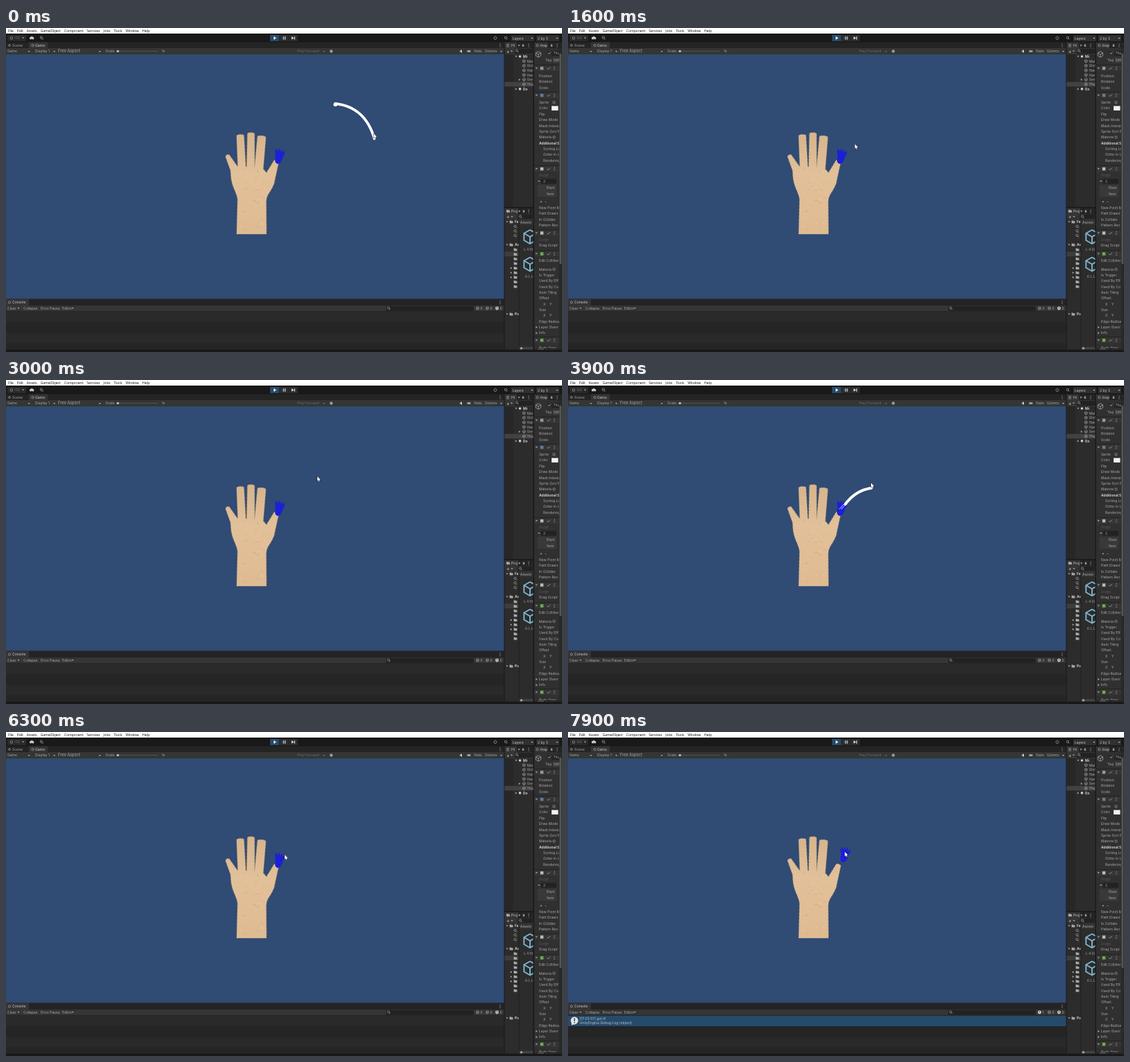
An HTML page with a canvas that plays this animation: 800 by 467 pixels, repeating every 8000 ms.

```html
<!DOCTYPE html>
<html>
<head>
<meta charset="utf-8">
<style>
html, body { margin: 0; width: 100%; height: 100%; overflow: hidden; background: #191919; }
canvas { display: block; }
</style>
</head>
<body>
<canvas id="stage" width="800" height="467"></canvas>
<script>
const stage = document.getElementById('stage');
const ui = document.createElement('canvas');
ui.width = 800;
ui.height = 467;
let g = ui.getContext('2d');

const LOOP = 8000, STEP = 100;
const SANS = 'Inter, Roboto, sans-serif';
const MENU = '"Open Sans", sans-serif';
const TAB = '#242424', BAR = '#353535', PANEL = '#2c2c2c', FIELD = '#222', INK = '#aaa', BRIGHT = '#cfcfcf';

let seed = 7;
const rnd = () => (seed = seed * 16807 % 2147483647) / 2147483647;
const mix = (a, b, f) => a + (b - a) * f;
const ease = f => f * f * (3 - 2 * f);

function box(x, y, w, h, color) {
  g.fillStyle = color;
  g.fillRect(x, y, w, h);
}
function text(s, x, y, color = INK, size = 5, weight = 400, font = SANS) {
  g.font = `${weight} ${size}px ${font}`;
  g.textBaseline = 'middle';
  g.fillStyle = color;
  g.fillText(s, x, y + 0.3);
  return g.measureText(s).width;
}
function trace(pts, close) {
  g.beginPath();
  pts.forEach(([x, y]) => g.lineTo(x, y));
  if (close) g.closePath();
}
function poly(pts, color) {
  trace(pts, true);
  g.fillStyle = color;
  g.fill();
}
function line(pts, color, width = 0.8) {
  trace(pts);
  g.strokeStyle = color;
  g.lineWidth = width;
  g.stroke();
}
function dot(x, y, r, color) {
  g.beginPath();
  g.arc(x, y, r, 0, 7);
  g.fillStyle = color;
  g.fill();
}
function ring(x, y, r, color = INK, width = 0.7) {
  g.beginPath();
  g.arc(x, y, r, 0, 7);
  g.strokeStyle = color;
  g.lineWidth = width;
  g.stroke();
}
function panel(x, y, w, h, draw) {
  g.save();
  g.beginPath();
  g.rect(x, y, w, h);
  g.clip();
  draw();
  g.restore();
}

// small icons
const down = (x, y, c = INK) => poly([[x - 1.6, y - 0.9], [x + 1.6, y - 0.9], [x, y + 1.1]], c);
const right = (x, y, c = INK, r = 1.6) => poly([[x - r * 0.7, y - r], [x + r * 0.8, y], [x - r * 0.7, y + r]], c);
function dots(x, y) {
  for (let i = -1; i < 2; i++) box(x - 0.5, y + i * 2 - 0.5, 1, 1, INK);
}
function lens(x, y) {
  ring(x, y - 0.5, 1.6);
  line([[x + 1.1, y + 0.7], [x + 2.4, y + 2.1]], INK);
}
function lock(x, y) {
  box(x - 1.2, y - 0.3, 2.4, 2, INK);
  ring(x, y - 0.7, 0.9, INK, 0.6);
}
function folder(x, y) {
  box(x - 2.4, y - 2, 2.4, 1, INK);
  box(x - 2.4, y - 1.3, 4.8, 3.2, INK);
}
function cube(x, y, r, color, width) {
  const at = i => [x + r * Math.sin(i * Math.PI / 3), y - r * Math.cos(i * Math.PI / 3)];
  line([0, 1, 2, 3, 4, 5, 6].map(at), color, width);
  for (const i of [1, 3, 5]) line([[x, y], at(i)], color, width);
}
function tab(x, y, w, label, tx) {
  box(x, y, w, 9, BAR);
  text(label, tx, y + 4.6, BRIGHT);
}
function badge(x, color, count) {
  dot(x, 404, 2.4, color);
  box(x - 0.4, 402.4, 0.9, 2.2, '#444');
  text(count, x + 4, 404);
}

function drawMenu() {
  box(0, 0, 800, 8, '#fff');
  let x = 3;
  for (const s of 'File Edit Assets GameObject Component Services Jobs Tools Window Help'.split(' '))
    x += text(s, x, 4, '#111', 5, 400, MENU) + 5;

  box(2, 10, 27, 9, '#2a2a2a');
  ring(8, 14.5, 1.8);
  text('GC', 13, 14.5, '#777');
  down(24.5, 14.5);
  for (let i = 0; i < 3; i++) dot(35.5 + i * 1.6, 14.8 - i % 2, 1.7, '#ccc');
  ring(51, 14, 1.8, '#888');
  line([[49, 12], [54, 17]], '#888');
  for (let i = 0; i < 3; i++) box(380 + i * 13.4, 10, 12.9, 9, i ? '#2d2d2d' : '#294a6b');
  right(387, 14.5, '#e4eef8', 2.6);
  for (const u of [398.6, 401.1, 414.6]) box(u, 12.3, 1.2, 4.5, '#ddd');
  right(412.5, 14.5, '#ddd', 2.3);
  ring(704, 14.5, 2);
  lens(719, 14.5);
  for (const [s, u] of [['Layers', 727], ['2 by 3', 763]]) {
    box(u, 10.5, 33, 8.5, '#303030');
    text(s, u + 2, 14.7, BRIGHT);
    down(u + 30, 14.8);
  }
}

function drawGame() {
  box(0, 20.5, 716.5, 9, TAB);
  ring(5, 25, 1.4);
  text('Scene', 9, 25);
  tab(33, 20.5, 27, 'Game', 42);
  ring(38.5, 25, 1.6);
  dots(711, 25);
  box(0, 29, 716.5, 9, BAR);
  for (const [s, x, arrow] of [['Game', 2, 33], ['Display 1', 42, 69.5], ['Free Aspect', 75, 135], ['Gizmos', 689, 712.5]]) {
    text(s, x, 33.5, INK, s[0] === 'F' ? 5.6 : 5);
    down(arrow, 33.8);
  }
  text('Scale', 143, 33.5);
  box(158, 33.2, 60, 0.8, '#5c5c5c');
  dot(161, 33.5, 1.8, '#b5b5b5');
  text('1x', 224, 33.5);
  text('Play Focused', 419, 33.5, '#6c6c6c');
  down(457.5, 33.8, '#6c6c6c');
  dot(468, 33.5, 2.2, '#999');
  poly([[652.5, 33.5], [656, 31], [656, 36]], '#ccc');
  box(663.5, 32, 5, 3, '#999');
  text('Stats', 673, 33.5);
  box(0, 38, 716.5, 352.5, '#304b74');
}

function drawConsole() {
  box(0, 391, 716.5, 9, TAB);
  tab(0, 391, 33, 'Console', 9);
  ring(5, 395.5, 1.5);
  dots(711, 395.5);
  box(0, 400, 716.5, 8.5, BAR);
  text('Clear', 2, 404);
  text('Collapse', 25, 404);
  text('Error Pause', 50, 404);
  text('Editor', 81, 404);
  down(18, 404);
  down(96, 404);
  box(547, 400.7, 126, 7, FIELD);
  lens(550.5, 404);
  for (let i = 0; i < 4; i++) box(0, 409 + i * 15.3, 716.5, 15.3, i % 2 ? '#252525' : '#2a2a2a');
  box(0, 463.5, 716.5, 3.5, '#181818');
  badge(678.5, '#777', '0');
  badge(692.5, '#777', '0');
  badge(706.5, '#ccc', '0');
}

function drawHierarchy() {
  panel(717.5, 20.5, 41, 237.5, () => {
    box(717, 20, 42, 9, TAB);
    tab(717, 20.5, 18, 'Hi', 727);
    for (let i = 0; i < 3; i++) box(720, 23 + i * 1.8, 4, 0.7, INK);
    right(738.5, 25);
    lock(744, 25);
    dots(752, 25);
    box(717, 29, 42, 9, BAR);
    text('+', 720, 33.3, BRIGHT, 7);
    down(727.5, 33.5);
    box(732, 30, 28, 7, FIELD);
    lens(735, 33);
    box(717, 38, 42, 220, PANEL);
    box(717, 38, 13, 220, '#272727');
    box(717, 77.8, 42, 6.6, '#424242');
    ['Mi', 'Mai', 'Glob', 'Han', 'Han', 'Gen', 'Thu', 'Do'].forEach((s, i) => {
      const y = 41 + i * 6.7, scene = i % 7 === 0;
      if (scene) dot(739.5, y, 1.8, BRIGHT); else cube(745.3, y, 2.2, INK, 0.6);
      text(s, scene ? 744 : 749.5, y, scene ? BRIGHT : INK, 5, scene ? 700 : 400);
    });
    down(734, 41);
    right(739, 74.5);
    right(734, 88);
  });
}

function drawProject() {
  panel(717.5, 259.5, 41, 204, () => {
    box(717, 259, 42, 9, TAB);
    tab(717, 259.5, 20, 'Proj', 727);
    folder(722.5, 264);
    right(739, 264);
    lock(745, 264);
    dots(752, 264);
    box(717, 268, 42, 8, BAR);
    text('+', 720, 271.7, BRIGHT, 7);
    down(728, 272);
    box(736, 268.7, 24, 6.5, FIELD);
    lens(740, 272);
    box(717, 276, 42, 188, PANEL);
    box(738, 276, 21, 8, '#333');
    box(737.5, 276, 0.8, 188, '#1d1d1d');
    panel(717, 276, 20.5, 188, () => {
      box(717, 322.5, 21, 6.6, '#3d3d3d');
      for (const [s, y] of [['Fav', 279.5], ['Ass', 312.5], ['Pac', 412.5]]) {
        down(721, y);
        folder(727, y);
        text(s, 732, y, BRIGHT, 5, 700);
      }
      for (let i = 0; i < 3; i++) lens(732.5, 286.3 + i * 6.6);
      for (let i = 0; i < 9; i++) folder(733, 319.5 + i * 6.65);
      for (let i = 4; i < 7; i++) right(727, 319.5 + i * 6.65);
    });
    text('Assets', 740, 280);
    ['L-4 Di', '6-L Li'].forEach((s, i) => {
      cube(754, 301 + i * 39.5, 10, '#7fb6cf', 1.9);
      text(s, 745 + i * 2, 319.5 + i * 38.5, INK, 4.6);
    });
    box(738, 459, 21, 5, BAR);
    box(740, 461.5, 18, 0.7, '#666');
    dot(741.5, 461.8, 1.7, INK);
  });
}

// heading y, icon colour, first row y, rows
const sections = [
  [58, '#999', 69, 'Position|Rotation|Scale'],
  [97, '#5f7f9f', 107.3, 'Sprite|Color|Flip|Draw Mode|Mask Interac|Sprite Sort P|Materia|*Additional S|>Sorting La|>Order in La|>Rendering'],
  [203, '#bbb', 212, '-Script'],
  [0, '', 259, 'New Point M|Path Drawn|In Collider|Pattern Rec'],
  [295.5, '#bbb', 305, '-Script|Drag Script'],
  [325.5, '#6db04f', 335.5, 'Edit Collider'],
  [0, '', 347.8, 'Materia|Is Trigger|Used By Eff|Used By Co|Auto Tiling|Offset|>X    Y|Size|>X    Y|Edge Radius|Layer Overr|Info'],
  [450, '#6db04f', 461, 'Body Type']
];

function drawSection([head, color, top, rows]) {
  if (head) {
    box(760, head - 5, 36, 9, '#353535');
    box(760, head - 5, 36, 0.8, '#1d1d1d');
    down(763.3, head);
    box(768.8, head - 2.2, 4.5, 4.5, color);
    line([[778.5, head], [780, head + 1.5], [783, head - 1.5]], INK);
    dots(789, head);
  }
  rows.split('|').forEach((s, i) => {
    const label = s.replace(/^[*>-]/, ''), y = top + i * 8.35;
    const color = s[0] === '-' ? '#5c5c5c' : s[0] === '*' ? BRIGHT : INK;
    text(label, s[0] === '>' ? 773 : 767, y, color, 5, s[0] === '*' ? 700 : 400);
    if (label === 'Materia' || label === 'Sprite') ring(788.5, y, 1.7);
    if (label === 'Color') box(785, y - 3.2, 9.5, 6.4, '#f2f2f2');
  });
}

function drawInspector() {
  panel(760, 20.5, 40, 443, () => {
    box(760, 20, 40, 9, TAB);
    tab(760, 20.5, 19, 'Insp', 769);
    ring(764.5, 25, 1.6);
    lock(785, 25);
    dots(793, 25);
    box(760, 29, 40, 435, '#303030');
    cube(766, 38, 4.2, INK, 0.8);
    box(779.5, 34, 4.5, 4.5, FIELD);
    line([[780.3, 36], [781.4, 37.4], [783.3, 34.8]], '#ddd');
    box(786, 33, 10, 7, FIELD);
    text('Thu', 787.5, 36.5);
    text('Tag', 776, 46);
    box(787, 43, 9, 7, '#404040');
    text('Unt', 788, 46.3);
    sections.forEach(drawSection);
    box(770, 217.5, 22, 7, FIELD);
    text('2', 773, 221);
    down(767, 221);
    box(765, 226, 27, 17.5, '#393939');
    text('Elem', 778, 230.3);
    text('Item', 778, 239.3);
    text('+  -', 768, 250, BRIGHT, 6);
    for (const y of [431.3, 439.7]) right(763.5, y);
    box(795.8, 29, 4.2, 435, '#292929');
    box(796.4, 37, 2.8, 303, '#555');
    box(760, 461.5, 36, 4, '#292929');
    box(765, 462, 9, 2.2, '#555');
  });
}

// tapered limb from a base to a rounded tip; the last value of each end is half its width
function finger([bx, by, bw], [tx, ty, tw]) {
  const a = Math.atan2(ty - by, tx - bx), nx = -Math.sin(a), ny = Math.cos(a);
  const p = new Path2D();
  const cx = tx - Math.cos(a) * 2, cy = ty - Math.sin(a) * 2;
  p.moveTo(bx - nx * bw, by - ny * bw);
  p.lineTo(cx - nx * tw, cy - ny * tw);
  p.ellipse(cx, cy, 2, tw, a, -Math.PI / 2, Math.PI / 2);
  p.lineTo(bx + nx * bw, by + ny * bw);
  return p;
}

function drawHand() {
  const palm = new Path2D(`M332 297 L333.3 247 C332 235 323 228 323.5 206 L331 199 L369 202
    L386 222 C383 235 375 238 374.3 250 L374.7 297 Z`);
  const parts = [palm,
    finger([331, 208, 6.5], [318, 183, 3]),
    finger([339.6, 206, 5.7], [337, 153.5, 5.2]),
    finger([352, 206, 5.7], [352.5, 150.8, 5]),
    finger([363.6, 206, 6.2], [368, 155.3, 6]),
    finger([377, 222, 9], [389.7, 190.5, 3.5])];
  g.setLineDash([2, 1.3, 1, 0.7]);
  g.strokeStyle = '#a58a6c';
  g.lineWidth = 1.2;
  parts.forEach(p => g.stroke(p));
  g.setLineDash([]);
  const skin = g.createLinearGradient(0, 150, 0, 297);
  skin.addColorStop(0, '#d5b48c');
  skin.addColorStop(0.4, '#e2c099');
  skin.addColorStop(1, '#dfbb92');
  g.fillStyle = skin;
  parts.forEach(p => g.fill(p));
  for (let i = 0; i < 50; i++) {
    const x = 337 + rnd() * 33, y = 203 + rnd() * 90;
    line([[x, y], [x + 1 + rnd() * 3, y + rnd() * 3 - 1]], i % 3 ? 'rgba(180,145,105,.35)' : 'rgba(240,212,178,.5)', 1);
  }
}

function drawPaint(dx, dy) {
  g.save();
  g.translate(dx, dy);
  g.beginPath();
  g.ellipse(392.6, 187.8, 5.2, 8.3, 0.35, 0, 7);
  g.fillStyle = '#1b1edb';
  g.fill();
  for (let i = 0; i < 9; i++) {
    const a = mix(-1.85, -0.72, i / 8), r = i % 2 ? 15.7 : 13.3;
    line([[391, 190], [391 + r * Math.cos(a), 190 + r * Math.sin(a)]], '#1b1edb', 1.8);
  }
  line([[389, 192], [395, 180]], '#2a30c4', 0.6);
  g.restore();
}

// cursor tip: time, x, y
const path = [[0, 529, 152], [200, 528, 153], [900, 422, 141], [1600, 412.7, 167.3], [2700, 412.7, 167.3],
  [3000, 448, 139], [3200, 450, 140], [3600, 394, 182], [3900, 436, 148.3], [4500, 404, 178],
  [5300, 400.3, 177.5], [5900, 412, 163], [6500, 397.2, 182], [7300, 397.2, 182], [7900, 398.3, 172.7]];

function cursorAt(t) {
  const i = path.findIndex(k => k[0] >= t) || 1;
  const [a, x, y] = path[i - 1], [b, u, v] = path[i];
  const f = ease((t - a) / (b - a));
  return [mix(x, u, f), mix(y, v, f)];
}

function curve(a, b, c, part = 1) {
  return Array.from({ length: 17 }, (_, i) => {
    const f = i / 16 * part;
    return [0, 1].map(k => mix(mix(a[k], b[k], f), mix(b[k], c[k], f), f));
  });
}

function drawTrail(t) {
  g.lineCap = g.lineJoin = 'round';
  if (t < 300) {
    line(curve([474, 109], [517, 114], [530, 159.5]), '#fff', 3.8);
    dot(474, 110.3, 2.8, '#fff');
  }
  if (t > 3600 && t < 4200) {
    for (const x of [390.5, 393.5]) line([[x, 186], [x + 6.5, 179]], '#e8ebff', 0.9);
    line(curve([399, 179], [414, 159], [436.5, 155.8], Math.min(1, (t - 3600) / 300)), '#fff', 4);
  }
  g.lineCap = 'butt';
  g.lineJoin = 'miter';
}

function drawCursor([x, y]) {
  const arrow = [[0, 0], [0, 6.6], [1.5, 5.3], [2.5, 7.4], [3.5, 7], [2.6, 4.9], [4.6, 4.7]].map(([u, v]) => [x + u, y + v]);
  trace(arrow, true);
  g.strokeStyle = '#1a1a1a';
  g.lineWidth = 0.9;
  g.stroke();
  poly(arrow, '#fff');
}

function drawLog() {
  box(0, 409, 716.5, 15, '#254b6b');
  dot(9.3, 416, 5.4, '#e3e3e3');
  poly([[5, 418], [5, 422.5], [10, 421]], '#e3e3e3');
  box(8.6, 412.3, 1.5, 4.5, '#254b6b');
  box(8.6, 418, 1.5, 1.5, '#254b6b');
  text('[17:03:57] got it!', 16.5, 412.7, '#b8c2cc');
  text('UnityEngine.Debug:Log (object)', 16.5, 419, '#b8c2cc');
  box(675, 401, 13, 7, BAR);
  badge(678.5, '#ddd', '1');
}

box(0, 0, 800, 467, '#191919');
[drawMenu, drawGame, drawConsole, drawHierarchy, drawProject, drawInspector, drawHand].forEach(draw => draw());
g = stage.getContext('2d');

function render(t) {
  g.drawImage(ui, 0, 0);
  const drag = ease(Math.max(0, (t - 7300) / 600));
  drawPaint(5 * drag, -8 * drag);
  drawTrail(t);
  drawCursor(cursorAt(t));
  if (t >= 7500) drawLog();
}

const start = performance.now();
function tick() {
  const t = Math.max(0, performance.now() - start) % LOOP;
  render(Math.floor(t / STEP) * STEP);
  requestAnimationFrame(tick);
}
tick();
</script>
</body>
</html>
```
